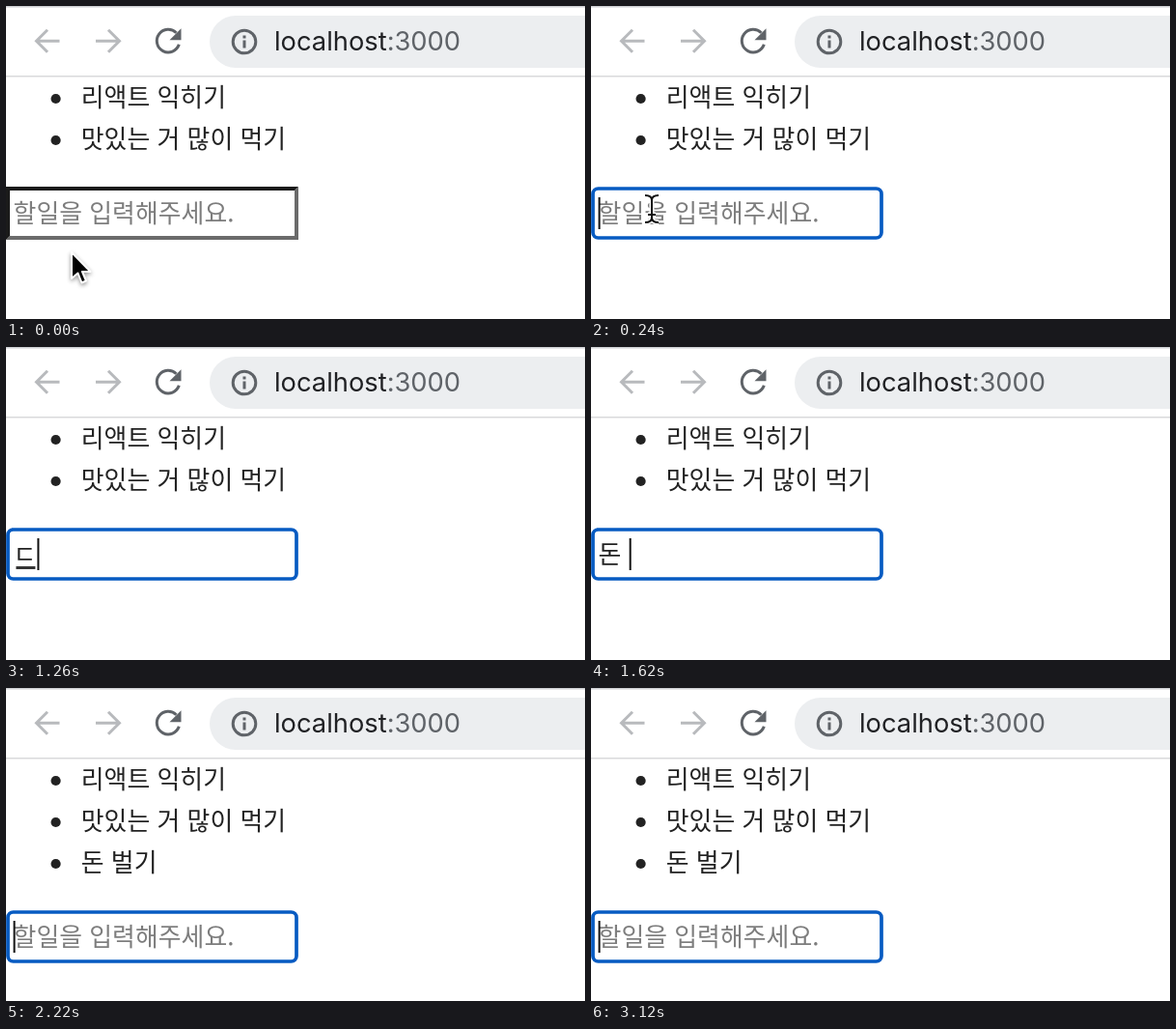
An HTML page for the animation above (3510 ms loop, 600x324 px).

```html
<!DOCTYPE html>
<html lang="ko">
<head>
<meta charset="utf-8">
<title>Todo input</title>
<style>
  html, body { margin: 0; width: 100%; height: 100%; overflow: hidden; background: #fff; }
  svg { display: block; }
  text { font: 25.9px "Noto Sans CJK KR", "Noto Sans CJK", sans-serif; fill: #222; white-space: pre; }
  .url { font: 27.3px Inter, Roboto, sans-serif; fill: #202124; }
  .line { fill: none; stroke-width: 3; }
</style>
</head>
<body>
<svg width="600" height="324" viewBox="0 0 600 324">
  <!-- browser toolbar -->
  <rect width="600" height="1.5" fill="#d0d2d5"/>
  <rect y="72" width="600" height="1.5" fill="#d9dadc"/>
  <rect x="211" y="10" width="440" height="54" rx="27" fill="#eceef0"/>
  <g transform="translate(0 -0.7)">
    <path class="line" stroke="#b8babd" d="M55.5 37H32M43 25.5L31.5 37L43 48.5M93 37H116.5M106 25.5L117.5 37L106 48.5"/>
    <path class="line" stroke="#5f6368" d="M176.5 28.5A11.8 11.8 0 1 0 179.3 40.5"/>
    <path fill="#5f6368" d="M181.5 24V36H169.5Z"/>
  </g>
  <circle class="line" stroke="#5f6368" cx="247" cy="37" r="11.8"/>
  <path class="line" stroke="#5f6368" d="M247 35.5V43.5M247 30.5V33.5"/>
  <text class="url" x="278" y="46.2">localhost<tspan fill="#5f6368">:3000</tspan></text>

  <!-- todo list -->
  <g><circle cx="51.6" cy="96" r="5.1" fill="#222"/><text x="77.8" y="104.3">리액트 익히기</text></g>
  <g transform="translate(0 43)"><circle cx="51.6" cy="96" r="5.1" fill="#222"/><text x="77.8" y="104.3">맛있는 거 많이 먹기</text></g>
  <g id="added" transform="translate(0 86)"><circle cx="51.6" cy="96" r="5.1" fill="#222"/><text x="77.8" y="104.3">돈 벌기</text></g>

  <g id="field">
    <g id="plain">
      <path fill="#6b6b6b" d="M303 187V242H0L4 238H299V191Z"/>
      <path fill="#1b1b1b" d="M0 242V187H303L299 191H4V238Z"/>
    </g>
    <rect id="ring" x="2" y="189" width="299" height="51" rx="5.5" fill="none" stroke="#075bc2" stroke-width="3.7"/>
    <text id="hint" x="7.6" y="223.7" style="fill:#7d7d7d">할일을 입력해주세요.</text>
    <text id="typed" x="7.6" y="223.7"></text>
    <rect id="underline" y="227" width="20" height="3" fill="#333"/>
    <rect id="caret" y="198" width="2" height="33" fill="#111"/>
  </g>

  <!-- pointers, drawn around their hot spots -->
  <path id="arrow" d="M0 0V27L6.5 21.5L10.5 31.5L15 29.5L11 20H19.5Z" fill="#000" stroke="#fff" stroke-width="2"
        stroke-linejoin="round" style="filter:drop-shadow(0 2px 2px #0006)"/>
  <g id="beam" fill="none">
    <path id="beamShape" d="M-7 -14Q0 -14 0 -9V9Q0 14 -7 14M7 -14Q0 -14 0 -9V9Q0 14 7 14M-4 6H4"
          style="stroke:inherit;stroke-width:inherit"/>
    <use href="#beamShape" stroke="#fff" stroke-width="5"/>
    <use href="#beamShape" stroke="#111" stroke-width="2"/>
  </g>
</svg>
<script>
const LOOP = 3510, FOCUS = 210, TYPE = 1140, SUBMIT = 2220, TEXT_X = 7.6;
const $ = id => document.getElementById(id);
const show = (id, on) => { $(id).style.display = on ? '' : 'none'; };

// [time, text]; a trailing space commits the syllable being composed
const keys = [[TYPE, 'ㄷ'], [1320, '도'], [1440, '돈'], [1620, '돈 '],
  [1710, '돈 ㅂ'], [1770, '돈 버'], [1830, '돈 벌'], [1920, '돈 벍'], [1980, '돈 벌기']];
const pointerPath = [[0, 68, 255], [150, 63, 217], [240, 63, 210]];

function pointerAt(t) {
  const next = pointerPath.findIndex(p => p[0] > t);
  if (next < 0) return pointerPath.at(-1).slice(1);
  const [t0, x0, y0] = pointerPath[next - 1], [t1, x1, y1] = pointerPath[next];
  const k = (t - t0) / (t1 - t0);
  return [x0 + (x1 - x0) * k, y0 + (y1 - y0) * k];
}

function caretVisible(t) {
  if (t < FOCUS) return false;
  return !(t >= 690 && t < TYPE) && !(t >= 2670 && t < 3090);
}

function draw(t) {
  const submitted = t >= SUBMIT;
  const text = submitted ? '' : (keys.findLast(k => t >= k[0]) || [0, ''])[1];
  const focused = t >= FOCUS;
  show('added', submitted);
  show('plain', !focused);
  show('ring', focused);
  show('hint', !text);
  $('field').setAttribute('transform', `translate(0 ${submitted ? 43 : 0})`);

  $('typed').textContent = text;
  const caretX = TEXT_X + (text ? $('typed').getComputedTextLength() + 1 : 0);
  $('caret').setAttribute('x', caretX);
  $('underline').setAttribute('x', caretX - 22);
  show('caret', caretVisible(t));
  show('underline', text && !text.endsWith(' '));

  const [x, y] = pointerAt(t), overField = y < 242;
  for (const id of ['arrow', 'beam']) $(id).setAttribute('transform', `translate(${x} ${y})`);
  show('arrow', !overField);
  show('beam', overField && t < TYPE);
}

const start = performance.now();
function tick() {
  const t = (performance.now() - start) % LOOP;
  draw(Math.floor(t / 30) * 30);
  requestAnimationFrame(tick);
}
tick();
</script>
</body>
</html>
```
